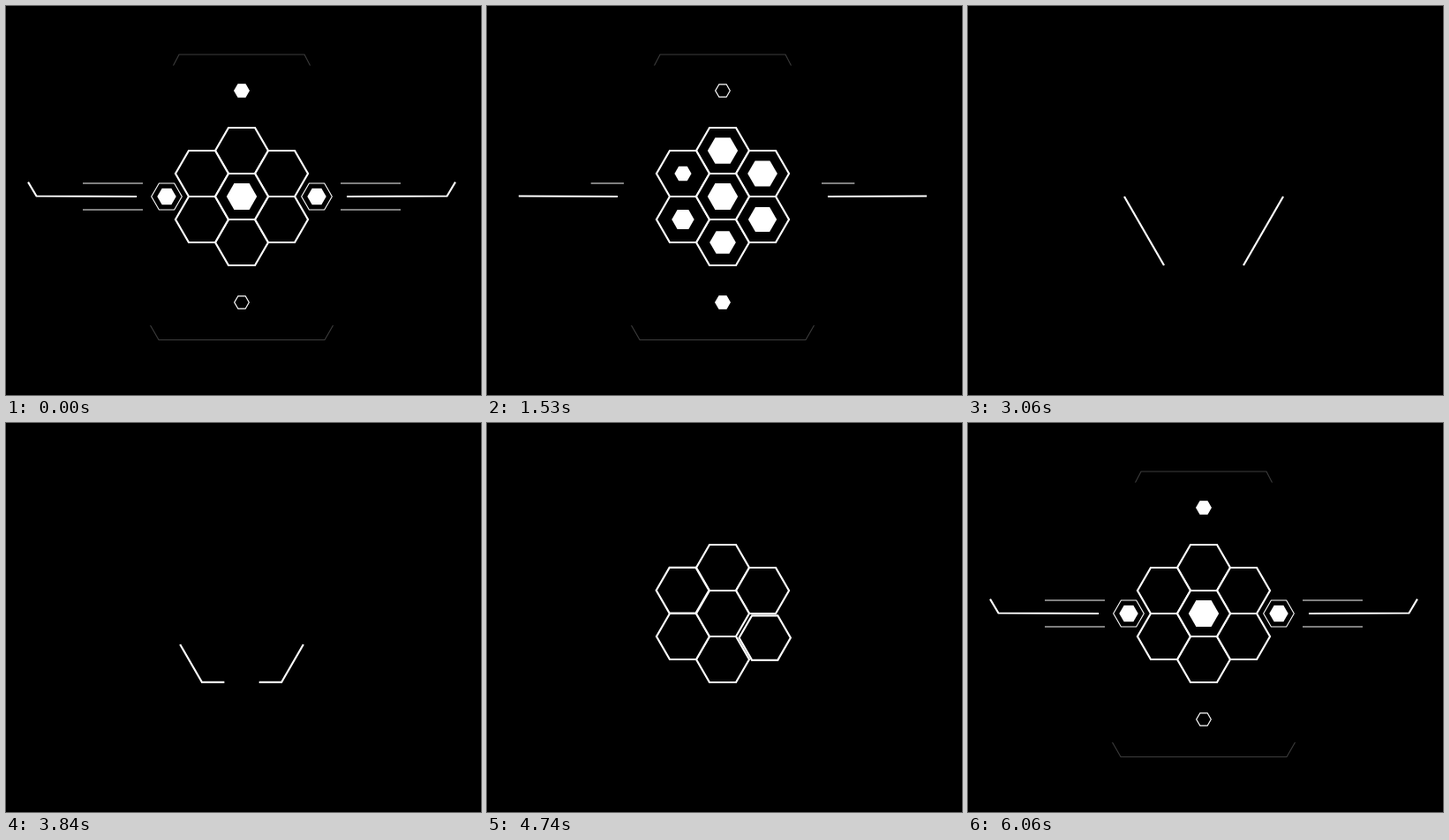
Animation of 538 by 441 pixels, one loop 6.15 s. Source, as an HTML page with a canvas:

```html
<!DOCTYPE html>
<html>
<head>
<meta charset="utf-8">
<style>
html, body { margin: 0; width: 100%; height: 100%; overflow: hidden; background: #000; }
canvas { display: block; }
</style>
</head>
<body>
<canvas id="stage" width="538" height="441"></canvas>
<script>
const g = document.getElementById('stage').getContext('2d');
const LOOP = 6150, STEP = 30, CX = 267, CY = 216, H = Math.sqrt(3) / 2;
// Petal directions in stacking order: bottom, top, then the diagonal pairs
const PETALS = [90, 270, 150, 330, 210, 30].map(d => d * Math.PI / 180);
const DELAYS = [0, 30, 116, 147, 202, 231];
const WAVE = [3, 0, 4, 1, 5, 2];
let t = 0;

function ease(start, dur = 385) {
  const p = Math.min(1, Math.max(0, (t - start) / dur));
  return p < .5 ? 4 * p ** 3 : 1 - 4 * (1 - p) ** 3;
}

// 1 at rest, leaves at "off" and returns at "on"
const shown = (off, on, dur) => 1 - ease(off, dur) + ease(on, dur);

function hex(x, y, r, fill, width = 0) {
  if (r < .02) return;
  g.beginPath();
  for (let i = 0; i < 6; i++) {
    const a = i * Math.PI / 3;
    g.lineTo(x + r * Math.cos(a), y + r * Math.sin(a));
  }
  g.closePath();
  if (fill) {
    g.fillStyle = fill;
    g.fill();
  }
  if (width) {
    g.strokeStyle = '#fff';
    g.lineWidth = width;
    g.stroke();
  }
}

// Strokes the part of a polyline between two distances
function trace(points, from, to, color, width) {
  if (to - from < .05) return;
  g.beginPath();
  let pos = 0;
  for (let i = 1; i < points.length; i++) {
    const [x, y] = points[i - 1], [u, v] = points[i];
    const len = Math.hypot(u - x, v - y);
    const a = Math.max(0, (from - pos) / len), b = Math.min(1, (to - pos) / len);
    if (a < b) {
      if (a > 0 || i === 1) g.moveTo(x + (u - x) * a, y + (v - y) * a);
      else if (from >= pos) g.moveTo(x, y);
      g.lineTo(x + (u - x) * b, y + (v - y) * b);
    }
    pos += len;
  }
  g.strokeStyle = color;
  g.lineWidth = width;
  g.stroke();
}

function both(draw) {
  for (const s of [-1, 1]) draw(x => CX + s * x);
}

function bracket(part, half, y, legX, legY) {
  const total = half + Math.hypot(legX, legY);
  both(X => trace([[X(0), y], [X(half), y], [X(half + legX), y + legY]],
    0, total * part, '#3c3c3c', 1.1));
}

function sides() {
  const thinTop = 68 * shown(1344, 4940);
  const thinLow = 68 * shown(1130, 5062);
  const main = 132 * shown(1401, 5177);
  const size = shown(1155, 4860);
  both(X => {
    trace([[X(112), 201], [X(180), 201]], 0, thinTop, '#a8a8a8', 1.3);
    trace([[X(112), 231], [X(180), 231]], 0, thinLow, '#a8a8a8', 1.3);
    trace([[X(119), 216], [X(232.5), 215.5], [X(242), 199.5]], 0, main, '#fff', 2.1);
    const x = X(67.5 + 17.5 * size);
    hex(x, CY, 17.3 * size, null, 1.1);
    hex(x, CY, 10.7 * size, '#fff');
  });
}

function markers() {
  const swap = t < 3300 ? ease(720) : 0;
  for (const [dir, off, on, fill] of [[-1, 1560, 5490, 1 - swap], [1, 1640, 5400, swap]]) {
    const size = shown(off, on);
    const y = CY + dir * (120 + 7.4 * (1 - size));
    hex(CX, y, 8.3 * size, null, 1.2);
    hex(CX, y, 8.3 * size * fill, '#fff');
  }
}

// Fills pulse clockwise around the ring
function pulse(i) {
  if (t < 3000) {
    const s = 90 + WAVE[i] * 30;
    return ease(s) - ease(s + 545) + ease(s + 1090) - ease(s + 1635);
  }
  const s = 4860 + WAVE[i] * 14;
  return ease(s, 180) - ease(s + 240, 180);
}

function petals() {
  if (t > 2700 && t < 4250) return;
  PETALS.forEach((a, i) => {
    const grow = t > 3000 ? ease(4250 + DELAYS[i], 320) : 1;
    if (!grow) return;
    const dist = t > 3000 ? 163 - 111 * grow : 52 * (1 - ease(2130 + DELAYS[i], 320));
    const x = CX + dist * Math.cos(a), y = CY + dist * Math.sin(a);
    hex(x, y, 30 * grow, '#000', 2.2);
    hex(x, y, 17.2 * pulse(i), '#fff');
  });
}

// Two mirrored strokes run around the large hexagon and wrap at its axis
function runners() {
  const u = t < 3435 ? t : 3300 - (t - 3540) * 380 / 570;
  if (u >= 3300) return;
  const late = u > 3060;
  const tail = late ? 135 + (u - 3060) * 242 / 240 : -45 + (u - 2920) * 180 / 140;
  const head = late ? 225 + (u - 3060) * 152 / 240 : 225;
  both(X => {
    const path = [[X(0), CY - 90 * H], [X(45), CY - 90 * H], [X(90), CY],
      [X(45), CY + 90 * H], [X(0), CY + 90 * H]];
    for (const shift of [-270, 0, 270]) {
      trace(path, Math.max(0, tail + shift), Math.min(270, head + shift), '#fff', 2.2);
    }
  });
}

function core() {
  if (t > 2920 && t < 4110) return runners();
  const r = t < 3300 ? 30 + 60 * ease(2600, 320) : 90 - 60 * ease(4114, 320);
  hex(CX, CY, r, '#000', 2.2);
  hex(CX, CY, 17.2 * shown(2311, 4860), '#fff');
}

function frame(now) {
  t = Math.floor(now % LOOP / STEP) * STEP;
  if (t < 90 || t >= 6060) t = t < 90 ? 0 : LOOP;
  g.fillStyle = '#000';
  g.fillRect(0, 0, 538, 441);
  bracket(shown(1750, 5560), 71, 55, 6.5, 12.5);
  bracket(shown(1875, 5680), 94, 378.5, 9.5, -16.5);
  sides();
  markers();
  petals();
  core();
  requestAnimationFrame(frame);
}
requestAnimationFrame(frame);
</script>
</body>
</html>
```
